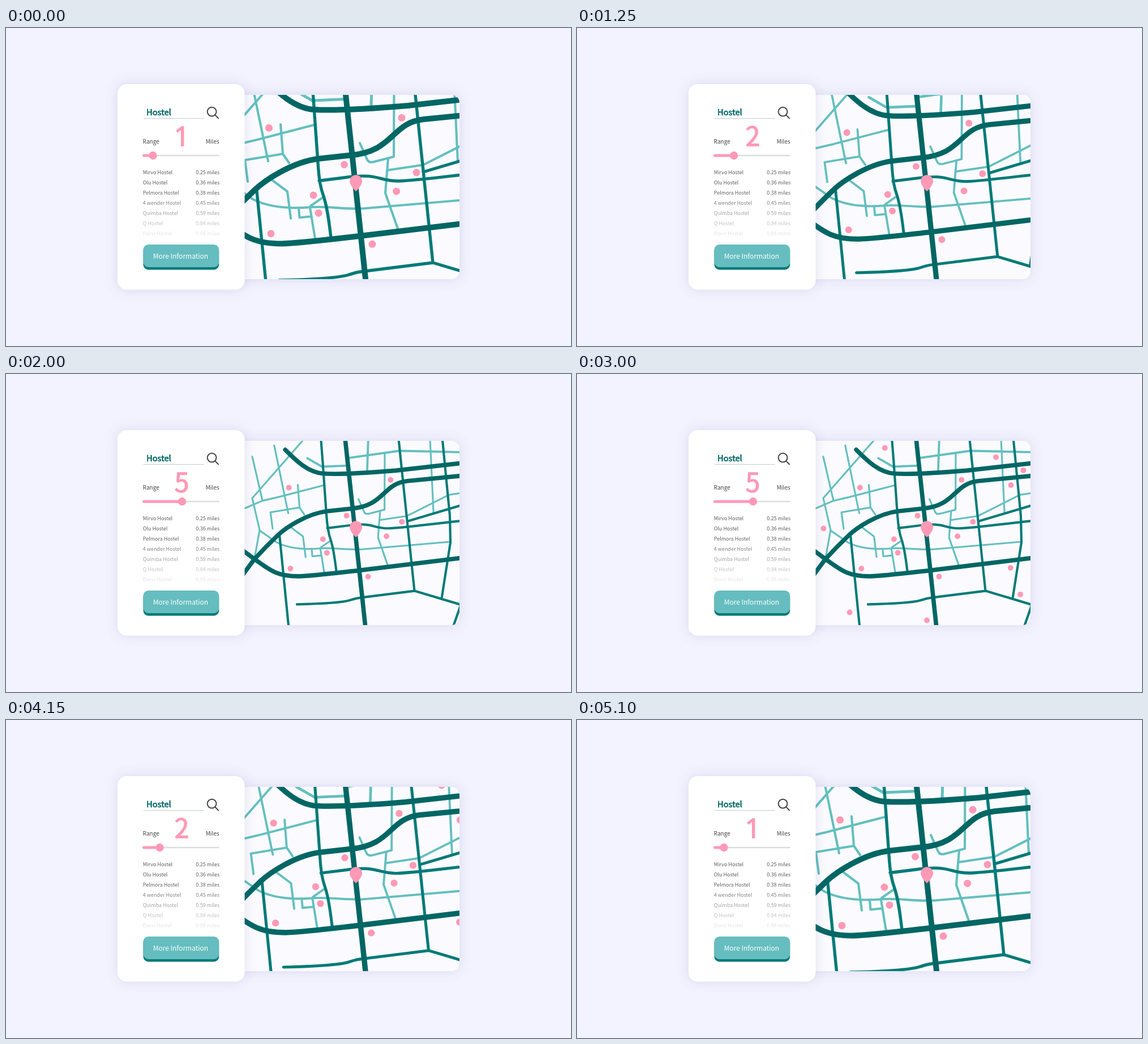
Write an HTML page with a canvas that moves like this. It is 998 px wide and 561 px high and loops after 5.7 s.

```html
<!DOCTYPE html>
<html lang="en">
<head>
<meta charset="utf-8">
<title>Hostel finder</title>
<style>
  html, body { margin: 0; width: 100%; height: 100%; overflow: hidden; background: #f3f3ff; }
  canvas { display: block; width: 100vw; height: 100vh; }
</style>
</head>
<body>
<canvas id="stage"></canvas>
<script>
const W = 998, H = 561, LOOP = 5700, STEP = 50;
const DARK = '#006664', TEAL = '#007a78', LIGHT = '#63bfbf', PINK = '#ff99b6', INK = '#444';
const SANS = '"Noto Sans CJK JP", "Noto Sans CJK SC", "Noto Sans CJK", "Noto Sans", sans-serif';
const CENTER = [615, 279.8], FAR = 0.766;

const canvas = document.getElementById('stage');
const ctx = canvas.getContext('2d');
const dpr = window.devicePixelRatio || 1;
canvas.width = W * dpr;
canvas.height = H * dpr;

// Streets are laid out at the closest zoom.
const streets = [
  { color: LIGHT, width: 4.1, path: new Path2D(
    'M430.6 79L463 235M497 67L380 200.4L397 274L385 340M380 105L403.5 206' +
    'M341 233L403.5 206.5L440 198L544 171' +
    'M485 170L489 222L500 238M427 271L422 233L489 222' +
    'M397 275L436 302C465 317 505 319 540 316C575 314.5 590 319.5 630 318.5L836 301' +
    'M467 266L497 288.5L503 336M517 317L518.5 334.5L538 332.5M537 317L546 372M538 314L558 300' +
    'M685.5 96L685 227L650 236Q640 239 637 230L625 203' +
    'M675 230L670 291L692 354M673 251L737 241.5L833 193L922 179M790 65L798 236') },
  { color: LIGHT, width: 5, path: new Path2D(
    'M507 108.5L541 128L600 125.5M648.5 30L645 138M602 108L719.4 91.4L922 96') },
  { color: TEAL, width: 5.4, path: new Path2D(
    'M538 60L542.5 118L551 238C553 270 556 283 561 297C568 318 571 345 574 370' +
    'M553 269.5L597 264C660 255 656 270 694 270C730 269 800 258.5 925 246' +
    'M715 40L723 118L754 414' +
    'M483 445C545 443.5 585 441 603 436C622 430 625 430 642 428L754 414L922 464' +
    'M818 60L835.6 241L837 302L816.7 431.5M442.5 283L464 498M737 254L922 199M863 440L841 503') },
  { color: DARK, width: 10, path: new Path2D(
    'M456 89C478 111 508 142 545 144S650 142 710 137L922 113' +
    'M341 400L384 342C404 320 424 300 440 285S505 236 553 230.5L608 224.5' +
    'C686 218 680 167 738 161L922 143' +
    'M593.8 60L641 498' +
    'M345 311L384 340C425 370 440 380.5 487 380.5C520 379.5 580 372 625 367L922 331') }
];

const nearDots = [[464.5, 176.3], [699, 158.3], [468, 362.7], [647, 381.3], [725, 255],
  [543, 295], [689.6, 288.2], [552, 326.4], [597.5, 241]];
const farDots = [[522, 85], [778.3, 106], [841.3, 136.3], [812.8, 170.4], [380.5, 270.3],
  [812, 361], [834.4, 422.4], [440.9, 463.5], [619, 481.8]];

const hostels = [['Mirvo Hostel', '0.25'], ['Olu Hostel', '0.36'], ['Pelmora Hostel', '0.38'],
  ['4 wender Hostel', '0.45'], ['Quimba Hostel', '0.59'], ['Q Hostel', '0.84'], ['Dorvi Hostel', '0.88']];

const progress = (t, from, to) => Math.min(1, Math.max(0, (t - from) / (to - from)));

function backOut(p, s) {
  const q = p - 1;
  return Math.max(0, 1 + q * q * ((s + 1) * q + s));
}

function box(x, y, w, h, r) {
  ctx.beginPath();
  ctx.roundRect(x, y, w, h, r);
}

function fillBox(x, y, w, h, r, color) {
  box(x, y, w, h, r);
  ctx.fillStyle = color;
  ctx.fill();
}

function shadowBox(x, y, w, h, r, color) {
  ctx.save();
  ctx.shadowColor = 'rgba(90, 75, 150, 0.17)';
  ctx.shadowBlur = 22 * dpr;
  fillBox(x, y, w, h, r, color);
  ctx.restore();
}

function disc(x, y, r, color) {
  ctx.beginPath();
  ctx.arc(x, y, r, 0, Math.PI * 2);
  ctx.fillStyle = color;
  ctx.fill();
}

function line(x1, y1, x2, y2, width, color, cap = 'round') {
  ctx.beginPath();
  ctx.moveTo(x1, y1);
  ctx.lineTo(x2, y2);
  ctx.lineWidth = width;
  ctx.lineCap = cap;
  ctx.strokeStyle = color;
  ctx.stroke();
}

function text(str, x, y, font, color, align = 'left') {
  ctx.font = font;
  ctx.fillStyle = color;
  ctx.textAlign = align;
  ctx.fillText(str, x, y);
}

// Regular letters thickened to a medium weight.
function heavyText(str, x, y, font, color, extra, align) {
  text(str, x, y, font, color, align);
  ctx.lineWidth = extra;
  ctx.lineJoin = 'miter';
  ctx.strokeStyle = color;
  ctx.strokeText(str, x, y);
}

function drawPin() {
  ctx.beginPath();
  ctx.arc(618, 270.3, 11, Math.PI * 0.82, Math.PI * 0.18);
  ctx.quadraticCurveTo(624.5, 282.5, 618, 288);
  ctx.quadraticCurveTo(611.5, 282.5, 609, 276.5);
  ctx.fillStyle = PINK;
  ctx.fill();
}

function drawMap(zoom, nearSize, farSize) {
  shadowBox(400, 118, 401, 325, 14, '#fbfbff');
  ctx.save();
  box(400, 118, 401, 325, 14);
  ctx.clip();
  ctx.translate(...CENTER);
  ctx.scale(zoom, zoom);
  ctx.translate(-CENTER[0], -CENTER[1]);
  ctx.lineCap = ctx.lineJoin = 'round';
  for (const s of streets) {
    ctx.strokeStyle = s.color;
    ctx.lineWidth = s.width;
    ctx.stroke(s.path);
  }
  for (const [x, y] of nearDots) disc(x, y, 6.5 * nearSize, PINK);
  for (const [x, y] of farDots) disc(x, y, 6.5 * farSize, PINK);
  ctx.restore();
  drawPin();
}

function drawSearch() {
  heavyText('Hostel', 248, 153.6, `14.7px ${SANS}`, DARK, 0.6);
  line(243, 159.5, 350, 159.5, 1, '#c3cdd0', 'butt');
  ctx.beginPath();
  ctx.arc(363.6, 147.6, 7.9, 0, Math.PI * 2);
  ctx.lineWidth = 2;
  ctx.strokeStyle = INK;
  ctx.stroke();
  line(369.3, 153.4, 375, 159.2, 2, INK);
}

function drawRange(range, miles) {
  const knob = 259.5 + 51.5 * range;
  text('Range', 241.6, 203.8, `10px ${SANS}`, INK);
  text('Miles', 376.6, 203.8, `10px ${SANS}`, INK, 'right');
  const font = miles === 1 ? '48px "Noto Sans", "Open Sans", sans-serif' : `46px ${SANS}`;
  heavyText(miles, 310.6, 208, font, PINK, 1.3, 'center');
  line(243.5, 225, 375.5, 225, 2.6, '#dcdcdc');
  line(243.5, 225, knob, 225, 5, PINK);
  disc(knob, 225, 7.2, PINK);
}

function drawList() {
  const fade = ctx.createLinearGradient(0, 286, 0, 370);
  fade.addColorStop(0, 'rgba(68, 68, 68, 0.88)');
  fade.addColorStop(1, 'rgba(68, 68, 68, 0.08)');
  const font = `300 9px ${SANS}`;
  hostels.forEach(([name, dist], i) => {
    const y = 257.8 + 17.95 * i;
    text(name, 241.7, y, font, fade);
    text(dist + ' miles', 377.2, y, font, fade, 'right');
  });
}

function drawButton() {
  fillBox(242.5, 384, 133.7, 42.5, 9, TEAL);
  fillBox(242.5, 382, 133.7, 40, 9, '#65bdbf');
  text('More Information', 308.4, 406.8, `12px ${SANS}`, '#fff', 'center');
}

function render(t) {
  const back = t >= 3850;
  const range = back ? 1 - progress(t, 3854, 4240) : progress(t, 860, 2000);
  const miles = 1 + (back ? Math.ceil(range * 4) : Math.floor(range * 4));
  const zoom = 1 + (FAR - 1) * range;
  const nearSize = t < 4650 ? 1 : backOut(progress(t, 4640, 5100), 1);
  const farSize = t >= 4600 ? 0 : backOut(progress(t, 2370, 3000), 1.5);

  ctx.setTransform(dpr, 0, 0, dpr, 0, 0);
  ctx.fillStyle = '#f3f3ff';
  ctx.fillRect(0, 0, W, H);
  drawMap(zoom, nearSize, farSize);
  shadowBox(197, 99, 224.5, 362.5, 16, '#fff');
  drawSearch();
  drawRange(range, miles);
  drawList();
  drawButton();
}

function tick(now) {
  render(Math.floor((now % LOOP) / STEP) * STEP);
  requestAnimationFrame(tick);
}
requestAnimationFrame(tick);
</script>
</body>
</html>
```
